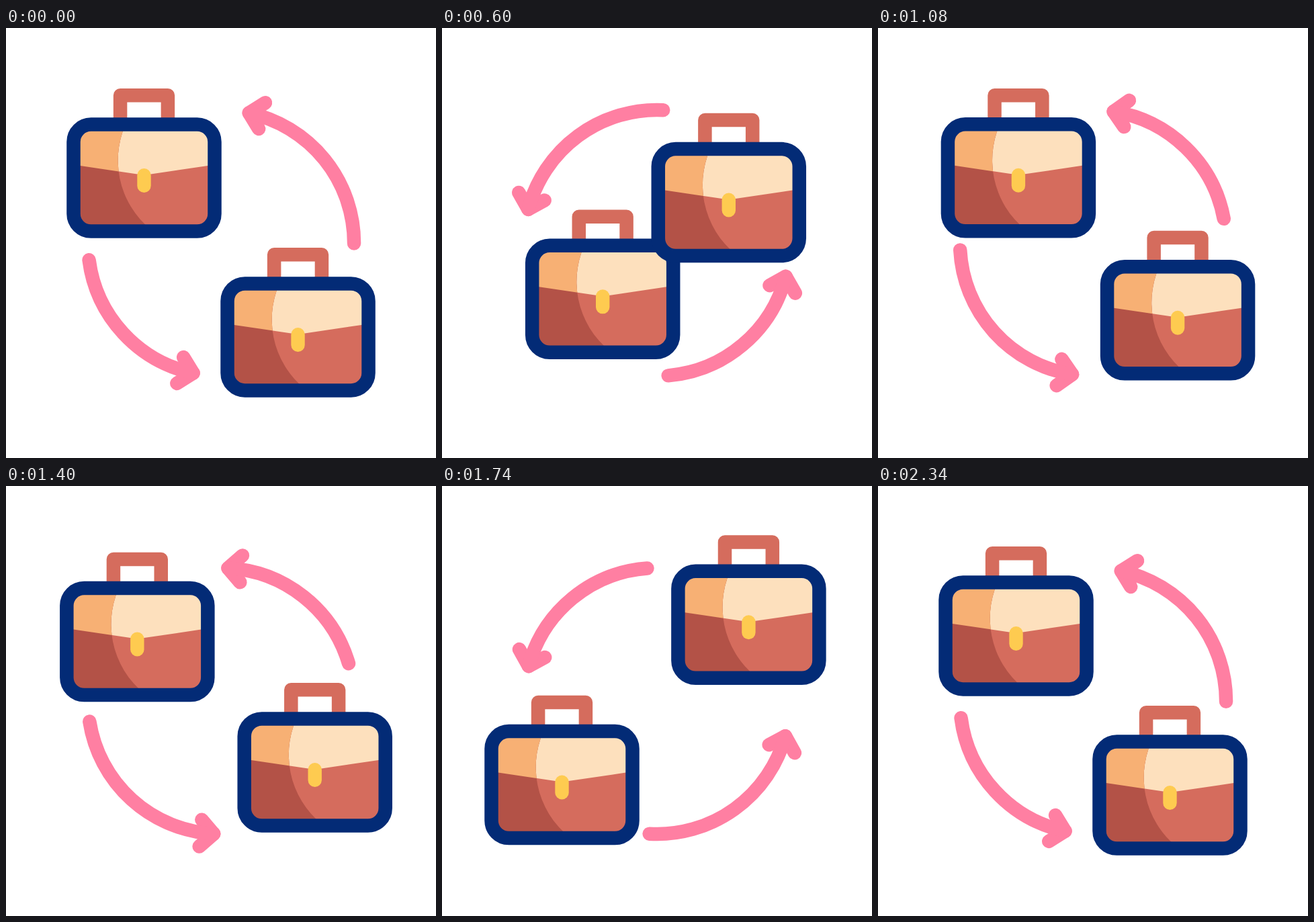
An HTML page without scripts that plays this animation: 640 by 640 pixels, repeating every 2400 ms.

```html
<!DOCTYPE html>
<html lang="en">
<head>
<meta charset="utf-8">
<title>Briefcase exchange</title>
<style>
  @property --turn  { syntax: "<angle>";  inherits: true; initial-value: 0deg; }
  @property --orbit { syntax: "<angle>";  inherits: true; initial-value: 46deg; }
  @property --r     { syntax: "<length>"; inherits: true; initial-value: 164.8px; }
  @property --x     { syntax: "<length>"; inherits: true; initial-value: 320px; }
  @property --y     { syntax: "<length>"; inherits: true; initial-value: 341.5px; }

  html, body { margin: 0; width: 100%; height: 100%; overflow: hidden; background: #fff; }
  svg { display: block; width: 100vw; height: 100vh; animation: swap 2400ms linear infinite; }

  .arrows {
    transform: translate(320px, 320px) rotate(var(--turn));
    fill: none; stroke: #ff7fa2; stroke-width: 20.5;
    stroke-linecap: round; stroke-linejoin: round;
  }
  /* Bags circle a drifting centre and stay upright. */
  .bag {
    transform: translate(var(--x), var(--y)) rotate(var(--orbit))
      translateX(calc(var(--r) * var(--side))) rotate(calc(-1 * var(--orbit)));
  }
  .first { --side: -1; }
  .second { --side: 1; }

  @keyframes swap {
    0%     { --turn: 0deg;      --orbit: 46deg;     --r: 164.8px; --x: 320px;   --y: 341.5px; }
    12.5%  { --turn: -8deg;     --orbit: 38deg;     --r: 158px;   --x: 322.5px; --y: 339px; }
    17.5%  { --turn: -19deg;    --orbit: 27.5deg;   --r: 147.5px; --x: 325px;   --y: 337px; }
    20%    { --turn: -29deg;    --orbit: 18.5deg;   --r: 139.5px; --x: 327px;   --y: 335.5px; }
    22.5%  { --turn: -49deg;    --orbit: -.5deg;    --r: 130px;   --x: 329.5px; --y: 334px; }
    25%    { --turn: -87deg;    --orbit: -36.9deg;  --r: 118.2px; --x: 333px;   --y: 331.5px; }
    27.5%  { --turn: -119deg;   --orbit: -71deg;    --r: 117px;   --x: 332px;   --y: 330.5px; }
    30%    { --turn: -142deg;   --orbit: -95deg;    --r: 121px;   --x: 331px;   --y: 330px; }
    33.33% { --turn: -162deg;   --orbit: -116deg;   --r: 134px;   --x: 329.5px; --y: 329.5px; }
    37.5%  { --turn: -175deg;   --orbit: -129.5deg; --r: 147.5px; --x: 328.5px; --y: 329px; }
    41.67% { --turn: -181deg;   --orbit: -136deg;   --r: 155.5px; --x: 328px;   --y: 328.8px; }
    45%    { --turn: -183.2deg; --orbit: -138.2deg; --r: 159px;   --x: 327.5px; --y: 328.8px; }
    52.5%  { --turn: -185.4deg; --orbit: -140.3deg; --r: 161px;   --x: 327.5px; --y: 328.8px; }
    58.33% { --turn: -189deg;   --orbit: -143.6deg; --r: 164px;   --x: 327.5px; --y: 328.8px; }
    62.5%  { --turn: -196deg;   --orbit: -150.4deg; --r: 170px;   --x: 329.5px; --y: 328.6px; }
    65%    { --turn: -202.5deg; --orbit: -156.7deg; --r: 175px;   --x: 330.5px; --y: 328.4px; }
    67.5%  { --turn: -213deg;   --orbit: -167deg;   --r: 179.5px; --x: 331px;   --y: 328px; }
    70%    { --turn: -235deg;   --orbit: -189deg;   --r: 182px;   --x: 329px;   --y: 327px; }
    72.5%  { --turn: -266.4deg; --orbit: -220.1deg; --r: 183.1px; --x: 317.5px; --y: 325.5px; }
    75%    { --turn: -297deg;   --orbit: -251deg;   --r: 179.5px; --x: 315px;   --y: 322px; }
    77.5%  { --turn: -319deg;   --orbit: -273deg;   --r: 174.5px; --x: 314px;   --y: 320px; }
    80.83% { --turn: -338.5deg; --orbit: -292.5deg; --r: 168.5px; --x: 314px;   --y: 326px; }
    84.17% { --turn: -350.4deg; --orbit: -304.3deg; --r: 165.2px; --x: 315px;   --y: 334px; }
    90%    { --turn: -357.5deg; --orbit: -311.7deg; --r: 165px;   --x: 318px;   --y: 340px; }
    97.5%, 100% { --turn: -360deg; --orbit: -314deg; --r: 164.8px; --x: 320px;  --y: 341.5px; }
  }
</style>
</head>
<body>
<svg viewBox="0 0 640 640">
  <defs>
    <clipPath id="body"><rect x="-105" y="-79.5" width="210" height="159" rx="26"/></clipPath>
    <clipPath id="shade"><path d="M-110-90H-22.5A133 133 0 0 0 11.3 78V90H-110Z"/></clipPath>
    <path id="flap" d="M-105-80H105V-19.5L0-4-105-19.5Z"/>
    <g id="bag">
      <path d="M-35.4-79V-122.7H35.4V-79" fill="none" stroke="#d56c5d" stroke-width="20.5" stroke-linejoin="round"/>
      <g clip-path="url(#body)">
        <rect x="-105" y="-80" width="210" height="160" fill="#d56c5d"/>
        <use href="#flap" fill="#fde0bd"/>
        <g clip-path="url(#shade)">
          <rect x="-105" y="-80" width="210" height="160" fill="#b35247"/>
          <use href="#flap" fill="#f7b074"/>
        </g>
      </g>
      <rect x="-105" y="-79.5" width="210" height="159" rx="26" fill="none" stroke="#032b76" stroke-width="20.5"/>
      <rect x="-10.2" y="-14" width="20.4" height="36" rx="10.2" fill="#fecb50"/>
    </g>
    <path id="head" d="M218 20.5 198 0 178 19"/>
  </defs>

  <g class="arrows">
    <g transform="rotate(-77.8)">
      <use href="#head"/>
      <path d="M198 0A198 198 0 0 1 41.2 193.7"/>
    </g>
    <g transform="rotate(102.1)">
      <use href="#head"/>
      <path d="M198 0A198 198 0 0 1 65.8 186.8"/>
    </g>
  </g>
  <g class="bag first"><use href="#bag"/></g>
  <g class="bag second"><use href="#bag"/></g>
</svg>
</body>
</html>
```
